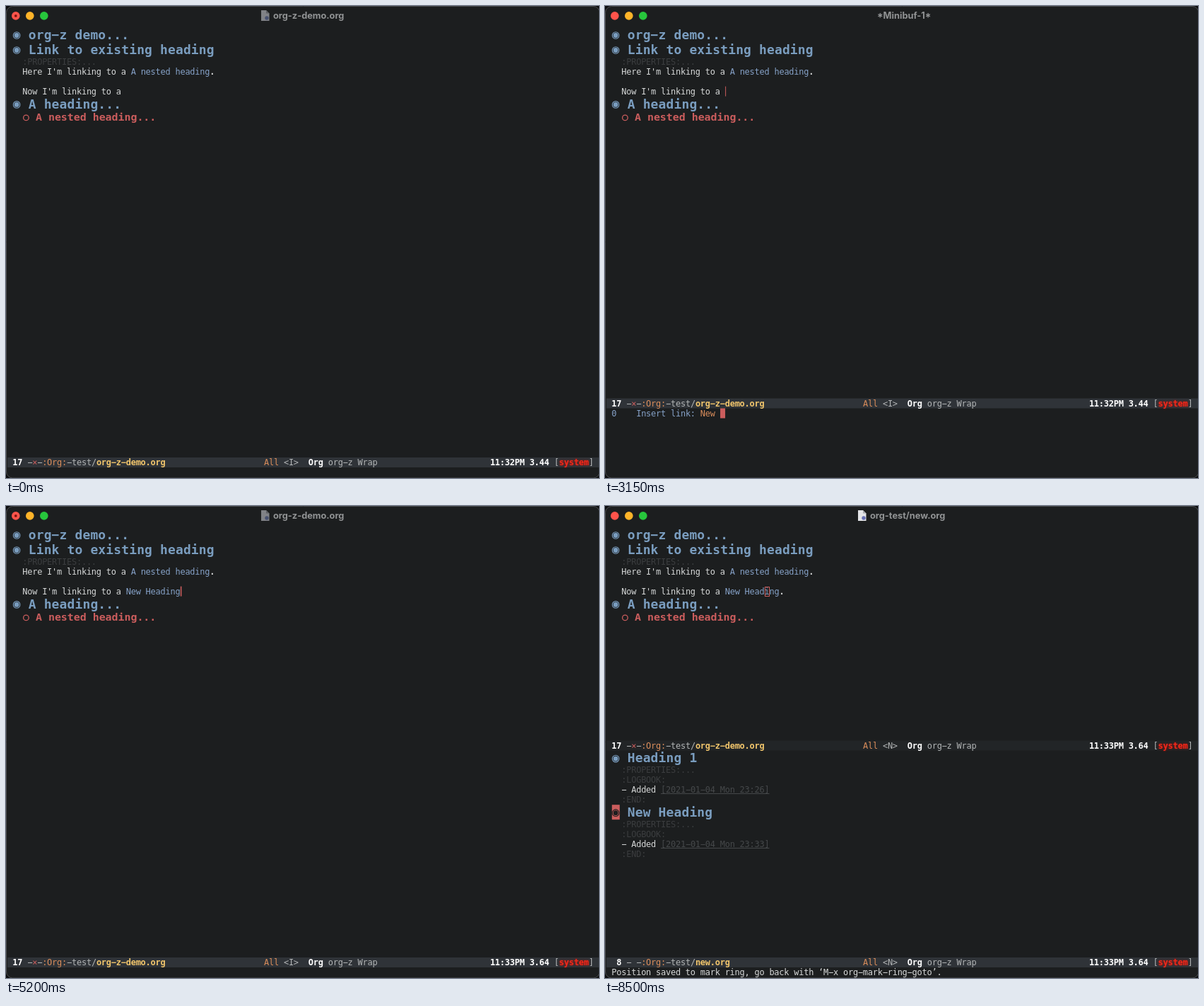
An HTML page with a canvas for the animation above (8550 ms loop, 839x667 px).

```html
<!DOCTYPE html>
<html lang="en">
<head>
<meta charset="utf-8">
<title>org-z demo</title>
<style>
html, body { margin: 0; width: 839px; height: 667px; overflow: hidden; background: #0c0d0e; }
canvas { display: block; }
</style>
</head>
<body>
<canvas id="stage" width="839" height="667"></canvas>
<script>
const ctx = document.getElementById('stage').getContext('2d');
const LOOP = 8550, LEFT = 9.3, CELL = 6.975, LINE = 13.95;
const MONO = '"DejaVu Sans Mono", monospace';
const SMALL = { px: 11.96, cell: CELL };
const BIG = { px: 17.94, cell: 10.96 };
const MID = { px: 14.95, cell: 8.97 };
const C = {
  bg: '#1c1e1f', fg: '#d6d8d8', dim: '#3b3d3f', blue: '#7a9dbf', link: '#86a2c8',
  red: '#cb5d5d', orange: '#d98d5b', yellow: '#f2c66c', white: '#ffffff',
  grey: '#b2b5b6', bar: '#2f3338', barOff: '#222527', alert: '#f02a1c'
};
// Moments at which the session changes
const AT = { space: 2150, prompt: 2600, grow: 2750, type: 2850, links: 4150,
  insert: 4900, dot: 5500, normal: 5750, left: 5900, split: 6500 };

const col = n => LEFT + n * CELL;

function text(s, x, y, color, bold = false, size = SMALL) {
  ctx.font = `${bold ? 'bold ' : ''}${size.px}px ${MONO}`;
  ctx.letterSpacing = (size.cell - size.px * 0.602).toFixed(3) + 'px';
  ctx.fillStyle = color;
  // the typeface on screen has long hyphens and centred asterisks
  ctx.fillText(s.replace(/-/g, '\u2212').replace(/\*/g, '\u2217'), x, y);
}

// Consecutive runs: [string, color, bold]
function runs(start, y, parts) {
  for (const [s, color, bold] of parts) {
    text(s, col(start), y, color, bold);
    start += s.length;
  }
}

function disc(x, y, r, color) {
  ctx.fillStyle = color;
  ctx.beginPath();
  ctx.arc(x, y, r, 0, 7);
  ctx.fill();
}

function ring(x, y, r, w, color) {
  ctx.strokeStyle = color;
  ctx.lineWidth = w;
  ctx.beginPath();
  ctx.arc(x, y, r, 0, 7);
  ctx.stroke();
}

function bullet(y, color) {
  ring(15.1, y, 4.8, 1.1, color);
  disc(15.1, y, 3.4, color);
}

function heading(s, y, selected) {
  if (selected) block(LEFT + 0.5, y - 16.8, 11, 21);
  bullet(y - 5.3, selected ? C.bg : C.blue);
  text(s, LEFT + 2 * BIG.cell + 0.5, y, C.blue, true, BIG);
}

function block(x, y, w, h) {
  ctx.fillStyle = C.red;
  ctx.fillRect(x, y, w, h);
}

function hollow(x, base) {
  ctx.strokeStyle = C.red;
  ctx.lineWidth = 1;
  ctx.strokeRect(Math.round(x) + 0.5, Math.round(base - 11) + 0.5, 6, 13);
}

function caret(n, base, w = 1.6) {
  block(col(n) + 0.4, base - 11, w, 14);
}

function fileIcon(x, fill, fold, mark) {
  ctx.fillStyle = fill;
  ctx.beginPath();
  ctx.moveTo(x, 6);
  ctx.lineTo(x + 7, 6);
  ctx.lineTo(x + 11.5, 10.5);
  ctx.lineTo(x + 11.5, 21);
  ctx.lineTo(x, 21);
  ctx.fill();
  ctx.fillStyle = fold;
  ctx.beginPath();
  ctx.moveTo(x + 7, 6);
  ctx.lineTo(x + 11.5, 10.5);
  ctx.lineTo(x + 7, 10.5);
  ctx.fill();
  disc(x + 8, 17, 2.7, mark);
}

function chrome(t) {
  ctx.fillStyle = '#0c0d0e';
  ctx.fillRect(0, 0, 839, 667);
  ctx.fillStyle = C.bg;
  ctx.strokeStyle = '#4b4d4f';
  ctx.lineWidth = 1;
  ctx.beginPath();
  ctx.roundRect(0.5, 0.5, 839.5, 666.5, 9);
  ctx.fill();
  ctx.stroke();

  disc(13.8, 13.9, 5.8, '#ff544b');
  disc(33.8, 13.9, 5.8, '#ffb429');
  disc(53.8, 13.9, 5.8, '#27c63c');

  const mini = t >= AT.prompt && t < AT.insert;
  let title = 'org-z-demo.org', x = 378;
  if (mini) {
    title = '*Minibuf-1*';
    x = 385;
  } else if (t >= AT.split) {
    title = 'org-test/new.org';
    x = 375;
    fileIcon(358, '#e4e5e8', '#a9abb0', '#6670b4');
  } else {
    disc(13.8, 13.9, 1.9, '#7d1410');
    fileIcon(361, '#808287', '#5d5f64', '#46506f');
  }
  ctx.font = 'bold 12.8px Inter, sans-serif';
  ctx.letterSpacing = '0px';
  ctx.fillStyle = '#919394';
  ctx.fillText(title, x, 18);
}

function modeLine(top, t, o) {
  const y = top + 11, right = n => col(n) - 1;
  ctx.fillStyle = o.active ? C.bar : C.barOff;
  ctx.fillRect(2, top, 837, 14);
  text(o.line, col(0), y, C.white, true);
  runs(3, y, o.name);
  text('All', col(51), y, C.orange);
  text(`<${o.state}>`, col(55), y, C.grey);
  text(o.mode, col(60), y, C.white, true);
  text(o.minor, col(61 + o.mode.length), y, C.grey);
  text(t < AT.links ? '11:32PM 3.44' : '11:33PM 3.64', right(97), y, C.white, true);
  text('[', right(110), y, C.grey);
  ctx.shadowColor = '#b01008';
  ctx.shadowBlur = 3;
  text('system', right(111), y, C.alert, true);
  ctx.shadowBlur = 0;
  text(']', right(117), y, C.grey);
}

const orgName = (file, flag) => [
  ['-', C.grey], [flag, flag === '×' ? C.red : C.grey], ['-', C.grey],
  [':Org:', C.orange], ['-test/', C.grey], [file, C.yellow, true]
];

function demoBuffer(t) {
  const base = 124.6;
  heading('org-z demo...', 46.8);
  heading('Link to existing heading', 67.8);
  text(':PROPERTIES:...', col(2), 82.7, C.dim);
  runs(2, 96.7, [["Here I'm linking to a ", C.fg], ['A nested heading', C.link], ['.', C.fg, true]]);
  text("Now I'm linking to a", col(2), base, C.fg);
  heading('A heading...', 144.7);
  ring(28.4, 157.9, 3.8, 1.3, C.red);
  text('A nested heading...', 42, 162, C.red, true, MID);

  if (t >= AT.insert) text('New Heading', col(23), base, C.link);
  if (t >= AT.dot) text('.', col(34), base, C.fg, true);

  if (t < AT.space) {
    if ((t + 600) % 1000 < 500) caret(22, base);
  } else if (t < AT.prompt) {
    caret(23, base);
  } else if (t < AT.insert) {
    caret(23, base, 1);
  } else if (t < AT.normal) {
    caret(t < AT.dot ? 34 : 35, base);
  } else if (t < AT.split) {
    const steps = Math.max(0, Math.min(3, Math.floor((t - AT.left) / 100) + 1));
    block(col(34 - steps) + 0.3, base - 11, 7, 14);
    text('.gni'[steps], col(34 - steps), base, C.bg);
  } else {
    hollow(col(31), base);
  }
}

function linksBuffer(t) {
  const y = 286.8;
  [
    'Insert a link.',
    'Use TAB to complete link prefixes, then RET for type-specific completion support',
    '',
    'Stored links are available with <up>/<down> or M-p/n (most recent with RET):',
    '',
    'New Heading'.padEnd(45) + '<id:5AE8276F-0DA5-439F-91FB-446F4ACA60C8>'
  ].forEach((s, i) => text(s, LEFT, y + i * LINE, C.fg));
  hollow(LEFT + 0.6, y);
  modeLine(498.7, t, {
    line: ' 1', name: [['U', C.grey], ['×', C.red], ['-', C.grey], ['*Org Links*', C.yellow, true]],
    state: 'N', mode: 'Fundamental', minor: 'org-z', active: true
  });
}

function entry(title, time, y, selected) {
  heading(title, y, selected);
  text(':PROPERTIES:...', col(2), y + 15, C.dim);
  text(':LOGBOOK:', col(2), y + 15 + LINE, C.dim);
  const log = y + 15 + 2 * LINE;
  text('- Added', col(2), log, C.fg);
  text(`[2021-01-04 Mon ${time}]`, col(10), log, '#45484a');
  ctx.fillRect(col(10), Math.round(log + 1), 22 * CELL, 1);
  text(':END:', col(2), log + LINE, C.dim);
}

function newBuffer(t) {
  entry('Heading 1', '23:26', 362.4, false);
  entry('New Heading', '23:33', 439, (t - AT.split) % 1000 < 500);
  modeLine(638, t, { line: ' 8', name: orgName('new.org', ' '), state: 'N',
    mode: 'Org', minor: 'org-z Wrap', active: true });
  text('Position saved to mark ring, go back with ‘M-x org-mark-ring-goto’.', LEFT, 663, C.fg);
}

function prompt(y, t) {
  const n = Math.max(0, Math.min(11, Math.floor((t - AT.type) / 100) + 1));
  runs(0, y, [['0', C.link], ['    ', C.link], ['Insert link: ', C.link],
    ['New Heading'.slice(0, n), C.orange]]);
  block(col(18 + n) + 0.3, y - 11, 7, 14);
}

function draw(t) {
  chrome(t);
  demoBuffer(t);

  const linksOpen = t >= AT.links && t < AT.insert;
  const splitOpen = t >= AT.split;
  const tall = t >= AT.grow && t < AT.links;
  const top = linksOpen ? 261.6 : splitOpen ? 331.5 : tall ? 554.5 : 638;
  modeLine(top, t, { line: '17', name: orgName('org-z-demo.org', '×'),
    state: t < AT.normal ? 'I' : 'N', mode: 'Org', minor: 'org-z Wrap',
    active: !linksOpen && !splitOpen });

  if (t >= AT.prompt && t < AT.links) prompt(top + 25, t);
  if (linksOpen) linksBuffer(t);
  if (splitOpen) newBuffer(t);
}

let start;
function tick(now) {
  if (start === undefined) start = now;
  draw((now - start) % LOOP);
  requestAnimationFrame(tick);
}
requestAnimationFrame(tick);
</script>
</body>
</html>
```
